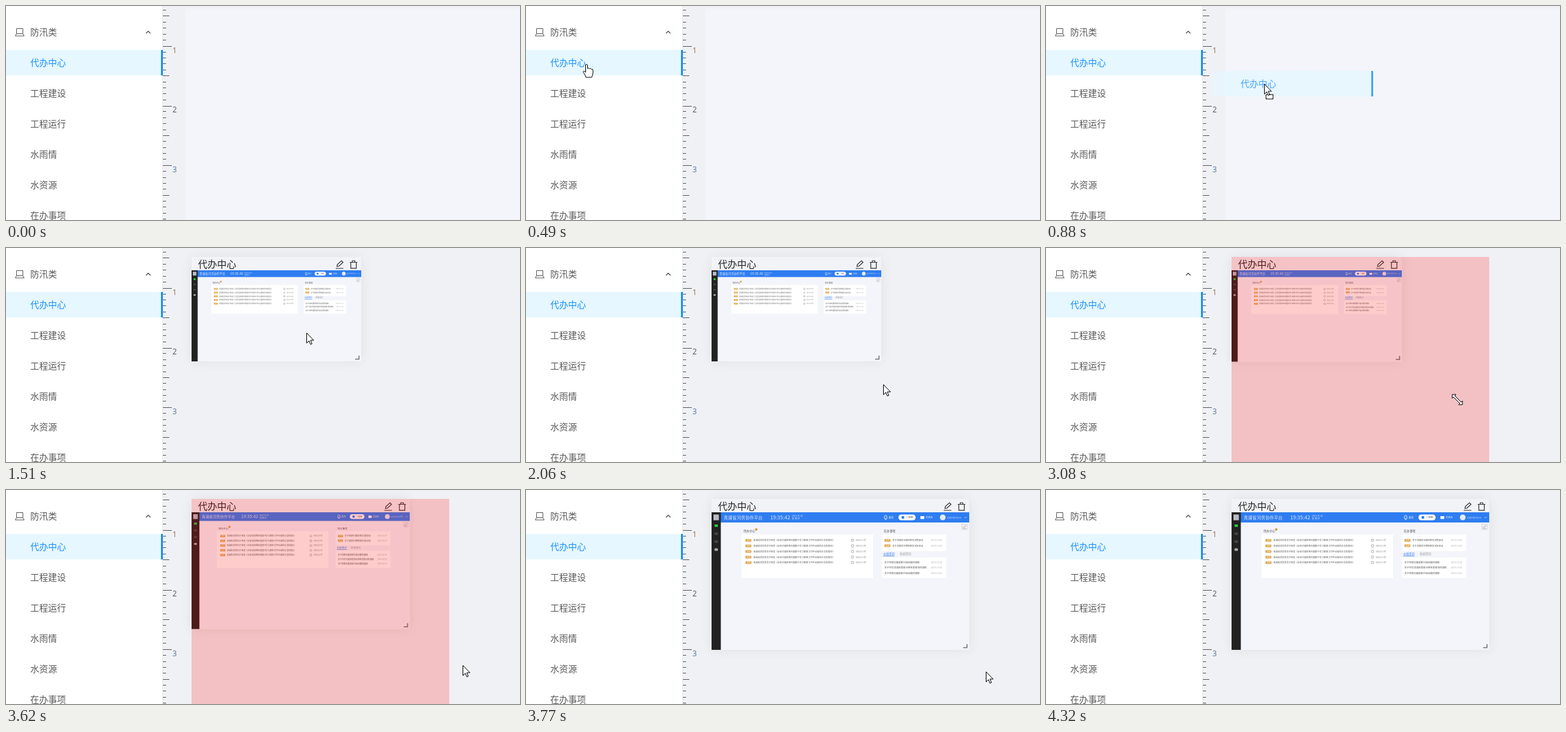
An HTML page with a canvas for the animation above (5.33 s loop, 806 px wide and 336 px high).

```html
<!DOCTYPE html>
<html lang="zh">
<head>
<meta charset="utf-8">
<title>拖拽布局</title>
<style>
html, body { margin: 0; width: 100%; height: 100%; overflow: hidden; background: #f0f1f5; }
canvas { display: block; }
</style>
</head>
<body>
<canvas id="stage" width="806" height="336"></canvas>
<script>
const ctx = document.getElementById('stage').getContext('2d');
const LOOP = 5330, TICK = 75;
const FONT = '"Noto Sans CJK SC", "Noto Sans CJK", sans-serif';
const INK = '#595959', BLUE = '#1890ff', HEADER = '#2f7df0';

// Pointer moves: each goes on from where the last one ended, bent towards `via`
const ENTRY = [594, 291];
const MOVES = [
  { start: 70, end: 570, to: [75, 89], via: [300, 110], cursor: 'arrow' },
  { start: 720, end: 1190, to: [471, 133], via: [305, 122], cursor: 'drag' },
  { start: 1510, end: 1750, to: [508, 153], cursor: 'arrow' },
  { start: 1980, end: 2450, to: [557, 186], via: [606, 275], cursor: 'arrow' },
  { start: 2540, end: 2700, to: [557, 173], cursor: 'resize' },
  { start: 2930, end: 3460, to: [715, 273], via: [633, 240], cursor: 'resize' },
  { start: 3540, end: 4010, to: [724, 291], via: [715, 272], cursor: 'arrow' },
  { start: 4090, end: 4320, to: [736, 340], cursor: 'arrow' }
];
const [, , DROP, , , STRETCH] = MOVES;
const GROWN = 3775;

const easeOut = k => 1 - (1 - k) ** 2.5;

// Motion is held between the evenly spaced steps of a move
function pointer(time) {
  const i = MOVES.findLastIndex(m => time + 4 >= m.start);
  if (i < 0) return { t: 0, cursor: null };
  const { start, end, to, via, cursor } = MOVES[i];
  const from = i ? MOVES[i - 1].to : ENTRY;
  const steps = Math.round((end - start) / TICK);
  const k = Math.min(steps, Math.floor((time + 4 - start) / (end - start) * steps)) / steps;
  const e = easeOut(k);
  const [x, y] = from.map((a, j) => {
    const mid = via ? via[j] : (a + to[j]) / 2;
    return Math.round(a * (1 - e) ** 2 + 2 * mid * e * (1 - e) + to[j] * e * e);
  });
  return { t: start + k * (end - start), x, y, cursor };
}

function box(x, y, w, h, color) {
  ctx.fillStyle = color;
  ctx.fillRect(x, y, w, h);
}

function pill(x, y, w, h, r, color) {
  ctx.fillStyle = color;
  ctx.beginPath();
  ctx.roundRect(x, y, w, h, r);
  ctx.fill();
}

function dot(x, y, r, color) {
  pill(x - r, y - r, 2 * r, 2 * r, r, color);
}

function label(str, x, y, size, color, font = FONT) {
  ctx.font = size + 'px ' + font;
  ctx.textBaseline = 'middle';
  ctx.fillStyle = color;
  ctx.fillText(str, x, y);
}

function line(d, color, width = 1) {
  ctx.strokeStyle = color;
  ctx.lineWidth = width;
  ctx.stroke(new Path2D(d));
}

function shape(d) {
  ctx.fillStyle = '#fff';
  ctx.fill(new Path2D(d));
  line(d, '#000');
}

function at(x, y, draw) {
  ctx.save();
  ctx.translate(x, y);
  draw();
  ctx.restore();
}

function menuItem() {
  box(243, 69, 3, 40, BLUE);
  label('代办中心', 38, 89, 14, BLUE);
}

function sidebar() {
  box(0, 0, 245, 336, '#fff');
  box(245, 0, 1, 336, '#e8e8e8');
  line('M16.5 35.5h10v8h-10zM16.5 43.5l-2 3.5h14l-2-3.5', INK);
  label('防汛类', 38, 41, 14, INK);
  line('M219.5 43l3.5-3.5l3.5 3.5', INK, 1.4);
  box(0, 69, 243, 40, '#e6f7ff');
  menuItem();
  ['工程建设', '工程运行', '水雨情', '水资源', '在办事项'].forEach((s, i) =>
    label(s, 38, 137 + 48 * i, 14, INK));
}

function ruler() {
  for (let n = -1; n < 35; n++) {
    const whole = n % 10 === 5, half = n % 10 === 0;
    const y = Math.round(15.4 + 9.375 * n + (whole ? 0.5 : 0));
    box(246, y, whole ? 14 : half ? 10 : 5, 1, INK);
  }
  ['#96723f', '#555', '#50739c'].forEach((c, i) =>
    label(i + 1, 261, 70.5 + 93.5 * i, 12, c, '"Open Sans", sans-serif'));
}

function penIcon(x, y, s, color) {
  at(x, y, () => {
    ctx.scale(s, s);
    line('M0 12.5h12M2 9.5l.5-3l6.5-6l2.5 2.5l-6.5 6z', color, 1.2);
  });
}

function trashIcon(x, y) {
  at(x, y, () => line('M0 3h12M4 3v-2.5h4v2.5M1.7 3v9.3h8.6v-9.3', '#333', 1.2));
}

function pageHeader() {
  const pale = '#dce9ff';
  box(291, 35, 404, 16, HEADER);
  label('青澜省河务协作平台', 310, 43, 6.8, pale);
  label('19:35:42', 383, 43, 8, pale);
  label('2019.10.20', 417, 41, 3.4, pale);
  label('星 期 日', 417, 45, 3.6, pale);
  line('M562 45v-3a2 2 0 0 1 4 0v3zM563 46.5h2', '#fff', 0.8);
  label('首页', 568.5, 43, 4, '#fff');
  pill(584, 38.5, 27, 9, 4.5, '#fff');
  dot(591, 43, 2.3, HEADER);
  label('一张图', 595.5, 43, 3.8, '#456');
  box(618.5, 41, 6, 4.5, '#fff');
  label('信息台', 627, 43, 3.7, '#fff');
  dot(653.5, 43, 4.5, '#e4ebf7');
  label('operator001', 660, 43, 4, '#b9d2ff');
  line('M688 42.5l1.3 1.3l1.3-1.3', '#fff', 0.7);
}

function pageRail() {
  box(291, 35, 14.5, 216, '#222');
  box(294, 38.5, 8.5, 9, '#b9bcc6');
  ['#2fc33c', '#444', '#444', '#aaa'].forEach((c, i) => pill(295.5, 54 + 12.5 * i, 5.5, 4, 1.5, c));
}

function tagged(str, x, y) {
  pill(x, y - 2.2, 9.5, 4.4, 1.5, '#e2aa55');
  label('文件', x + 2, y, 3, '#fff');
  label(str, x + 12.5, y, 3.45, '#555');
}

// Thumbnail of a page, laid out at full size from (291, 35)
function page() {
  box(291, 35, 404, 216, '#f4f5fa');
  pageHeader();
  pageRail();
  line('M683.5 53.5h8.5v8.5h-8.5z', '#c5c8d0', 0.7);
  penIcon(685, 55, 0.45, '#888');

  label('待办中心', 341, 64.5, 4.6, '#555');
  dot(361, 62, 2, '#d79a4a');
  box(338, 70, 206, 68, '#fff');
  for (let y = 79; y < 115; y += 8.75) {
    tagged('青澜省河务处关于转发《全省河道系统开展集中学习规章工作平台操作办法的意见》', 344, y);
    dot(512, y, 2.3, '#999');
    dot(512, y, 1.6, '#fff');
    label('4天21小时', 517, y, 3.5, '#888');
  }

  label('在办事项', 561, 64.5, 4.6, '#555');
  box(558, 70, 101, 26, '#fff');
  box(558, 106, 101, 32, '#fff');
  label('水政简讯', 560, 100, 4.5, HEADER);
  box(560, 103.5, 18, 0.7, HEADER);
  label('系统简讯', 586, 100, 4.5, '#999');
  const dated = y => label('2019.10.24', 635, y, 3.5, '#aaa');
  ['关于申请防汛器材相关决策会议', '关于发放防汛物资相关决定会议'].forEach((s, i) => {
    tagged(s, 562, 79 + 8.4 * i);
    dated(79 + 8.4 * i);
  });
  ['关于系统功能更新升级问题的通知', '关于节后河道巡查和水库检查情况的通知', '关于系统功能更新升级问题的通知'].forEach((s, i) => {
    label(s, 562, 113.5 + 8.4 * i, 3.7, '#555');
    dated(113.5 + 8.4 * i);
  });
}

function card(w, h) {
  const right = 291 + w;
  ctx.save();
  ctx.shadowColor = 'rgba(0,0,0,.07)';
  ctx.shadowBlur = 18;
  box(291, 14, w, h, '#f2f3f7');
  ctx.restore();
  at(291, 35, () => {
    ctx.scale(w / 404, (h - 21) / 216);
    ctx.translate(-291, -35);
    page();
  });
  label('代办中心', 301, 25, 15, '#222');
  penIcon(right - 40, 19.5, 1, '#333');
  trashIcon(right - 18, 19.5);
  at(right, 14 + h, () => line('M-3.5 -9v5.5h-6', '#777', 1.6));
}

function ghost(dx, dy) {
  at(dx, dy, () => {
    const fade = ctx.createLinearGradient(-9, 0, 18, 0);
    fade.addColorStop(0, 'rgba(230,247,255,.45)');
    fade.addColorStop(1, 'rgba(230,247,255,.85)');
    box(-9, 69, 252, 40, fade);
    ctx.globalAlpha = 0.8;
    menuItem();
  });
}

const CURSORS = {
  arrow() {
    shape('M.5 .5V16.3L4.2 12.8L6.6 18.4L8.9 17.4L6.5 11.9H11.5Z');
  },
  hand() {
    shape('M-1.5 1.5Q0 -.5 1.5 1.5V7Q3.5 5.5 4.5 7.5Q6.5 6.3 7.5 8.3Q10 7.5 10 10V14Q10 17 8 21H-1Q-2 17 -5.5 12.5Q-5 10 -1.5 13Z');
  },
  drag() {
    box(2, 16, 13, 9, '#fff');
    ctx.setLineDash([1, 1]);
    line('M3 17h11v7h-11z', '#000', 2);
    ctx.setLineDash([]);
    CURSORS.arrow();
  },
  resize() {
    shape('M-8 -8H-2L-4 -6L6 4L8 2V8H2L4 6L-6 -4L-8 -2Z');
  }
};

function render(time) {
  const { t, x, y, cursor } = pointer(time);

  box(0, 0, 806, 336, '#f0f1f5');
  if (t < DROP.start) {
    box(281, 4, 525, 332, '#f4f5fa');
  } else {
    const k = (t - STRETCH.start) / (GROWN - STRETCH.start);
    const p = Math.min(1, Math.max(0, k)) ** 2.9;
    card(266 + 138 * p, 164 + 73 * p);
    if (k > 0 && k < 0.99) box(291, 14, 404, 322, 'rgba(255,0,0,.2)');
  }
  sidebar();
  ruler();

  if (!cursor) return;
  if (cursor === 'drag') ghost(x - 75, y - 89);
  const overMenu = cursor === 'arrow' && x < 246;
  at(x, y, CURSORS[overMenu ? 'hand' : cursor]);
}

const begin = performance.now();
function tick() {
  render((performance.now() - begin) % LOOP);
  requestAnimationFrame(tick);
}
tick();
</script>
</body>
</html>
```
